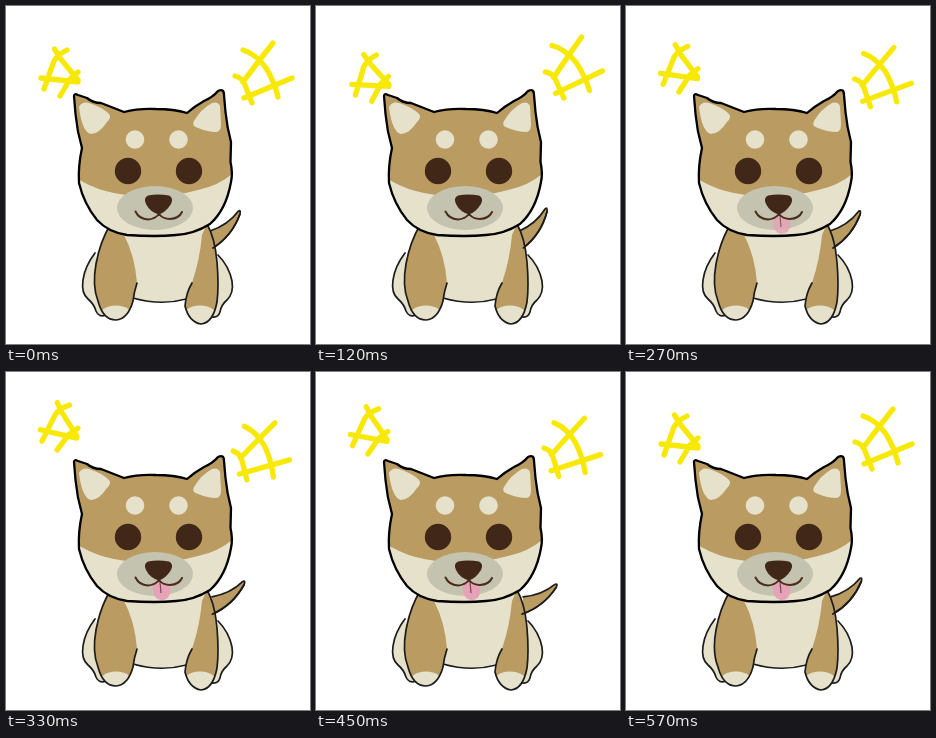
Recreate the animation shown at these times as an HTML page. Size 304x338 px, loop 0.6 s.

```html
<!DOCTYPE html>
<html lang="en">
<head>
<meta charset="utf-8">
<title>Happy puppy</title>
<style>
  html, body { margin: 0; width: 100%; height: 100%; overflow: hidden; background: #fff; }
  svg { display: block; width: 100vw; height: 100vh; }
  .brown { fill: #ba9c62; }
  .cream { fill: #e6e1cb; }
  .dark { fill: #402718; }
  .line { fill: none; stroke: #1c1c1c; stroke-width: 1.7; stroke-linecap: round; stroke-linejoin: round; }
  .spark { fill: none; stroke: #f8e806; stroke-width: 5.3; stroke-linecap: round; stroke-linejoin: round; }
</style>
</head>
<body>
<svg viewBox="0 0 304 338">
  <defs>
    <path id="head" d="M68 90Q68 87 72 89L81 92Q87 97 95 97L118 106Q133 102 150 103Q168 103 181 107Q189 100 198 95Q207 91 212 85Q218 82 218 89L219.500 106Q221 121 225 136L224.500 156Q227 167 225 176Q220 204 204 218Q188 228 170 229Q150 231 121 229Q102 226 91 214Q78 198 73 177Q72 160 76 142Q71 125 69.500 108Z"/>
    <clipPath id="inHead"><use href="#head"/></clipPath>
    <path id="legL" d="M104 219Q94 236 90 258Q86 280 92 295Q97 314 110 314Q122 313 127 295Q128 286 131 277Q129 250 118 229Z"/>
    <path id="legR" d="M201 218Q209 232 211 256Q213 280 211 296Q207 317 195 318Q183 316 179 300Q180 287 186 277Q194 252 196 229Z"/>
    <clipPath id="inLegL"><use href="#legL"/></clipPath>
    <clipPath id="inLegR"><use href="#legR"/></clipPath>
    <path id="footL" d="M89 247Q79 260 77 274Q75 287 82 293Q88 298 90 305Q93 312 100 309"/>
    <path id="footR" d="M212 249Q223 260 226 275Q228 287 221 294Q215 299 214 306Q212 312 206 311"/>
  </defs>

  <g id="sparks" class="spark">
    <path d="M48.500 43L54 52L72 74M61 44Q51 49 48 55L38 83M35 72L72 76M72 66L64 73L54 90"/>
    <path d="M267 37L249 60L237 76M237 44Q250 48 260 62Q268 75 272 91M229 70Q237 72 239 79L246 97M238 92L286 72"/>
  </g>

  <use href="#footL" class="cream"/>
  <use href="#footR" class="cream"/>
  <use href="#footL" class="line"/>
  <use href="#footR" class="line"/>

  <path id="tail" class="line" style="fill:#ba9c62" d="M204 225Q222 219 232 205.500Q235 203 234 208Q226 230 207 242"/>

  <path class="cream" d="M112 219H200L184 290Q155 301 126 292Z"/>
  <path class="line" d="M127 292Q155 300 180 293"/>
  <use href="#legL" class="brown"/>
  <use href="#legR" class="brown"/>
  <ellipse class="cream" cx="110" cy="312" rx="18" ry="12.500" clip-path="url(#inLegL)"/>
  <ellipse class="cream" cx="194" cy="313" rx="19" ry="13.500" clip-path="url(#inLegR)"/>
  <path class="line" d="M104 219Q94 236 90 258Q86 280 92 295Q97 314 110 314Q122 313 127 295Q128 286 131 277"/>
  <path class="line" d="M201 218Q209 232 211 256Q213 280 211 296Q207 317 195 318Q183 316 179 300Q180 287 186 277"/>
  <path id="tailEdge" class="line" d="M234 208Q226 230 207 242"/>

  <use href="#head" class="cream"/>
  <g clip-path="url(#inHead)">
    <path class="brown" d="M60 75H235V160L227 167Q214 179 192 184Q170 190 150 190Q99 192 69 171Z"/>
    <path class="cream" d="M73 101Q76 95 83 97Q96 101 103 108Q106 111 101 116Q93 128 85 128Q76 126 73 101Z"/>
    <path class="cream" d="M214 100Q212 95 206 97Q195 103 188 115Q185 120 192 122Q202 126 210 126Q215 126 215 118Z"/>
  </g>
  <ellipse cx="149" cy="202" rx="38" ry="22" fill="#c4c3b0"/>
  <circle class="cream" cx="129" cy="133.500" r="9.300"/>
  <circle class="cream" cx="172.500" cy="133.500" r="9.300"/>
  <circle class="dark" cx="122" cy="165" r="13.200"/>
  <circle class="dark" cx="183" cy="165" r="13.200"/>
  <g id="tongue">
    <path fill="#e6a2b7" d="M147 213Q150 212 153 209Q158 211 164 212Q166 228 155.500 228Q146 227 147 213Z"/>
    <path d="M154 210L155 221" fill="none" stroke="#7d4652" stroke-width="1.200"/>
  </g>
  <path d="M129.500 205.500Q133 213 142 213.500Q149 213 153 208Q157 213 164 213Q173 212.500 176 206" fill="none" stroke="#4c2d1b" stroke-width="2" stroke-linecap="round"/>
  <path class="dark" d="M142 189.500Q152 187.500 163 189.500Q168 192 165 198Q160 206 153 208.500Q144 206 140 198Q137 192 142 189.500Z"/>
  <use href="#head" class="line" style="stroke:#000;stroke-width:2.300"/>
</svg>
<script>
  const LOOP = 600, STEP = 30;
  const byId = id => document.getElementById(id);
  const sparks = byId("sparks"), tail = byId("tail"), tailEdge = byId("tailEdge"), tongue = byId("tongue");

  // Linear interpolation through [time, value] keys.
  function track(keys, t) {
    const i = keys.findIndex(key => key[0] > t);
    if (i < 0) return keys[keys.length - 1][1];
    if (i === 0) return keys[0][1];
    const [t0, v0] = keys[i - 1], [t1, v1] = keys[i];
    return v0 + (v1 - v0) * (t - t0) / (t1 - t0);
  }

  const sparkKeys = [[0, 0], [180, -4.6], [360, 9.2], [540, 0]];
  const tailKeys = [[0, 0], [200, -9], [400, 18], [600, 0]];
  const tongueKeys = [[150, 0], [300, 1]];

  function draw(time) {
    const t = Math.floor(time % LOOP / STEP) * STEP;
    sparks.setAttribute("transform", `rotate(${track(sparkKeys, t)} 153 60)`);
    const wag = `rotate(${track(tailKeys, t)} 206 238)`;
    tail.setAttribute("transform", wag);
    tailEdge.setAttribute("transform", wag);
    tongue.setAttribute("opacity", track(tongueKeys, t));
  }

  const start = performance.now();
  function tick() {
    draw(performance.now() - start);
    requestAnimationFrame(tick);
  }
  tick();
</script>
</body>
</html>
```
